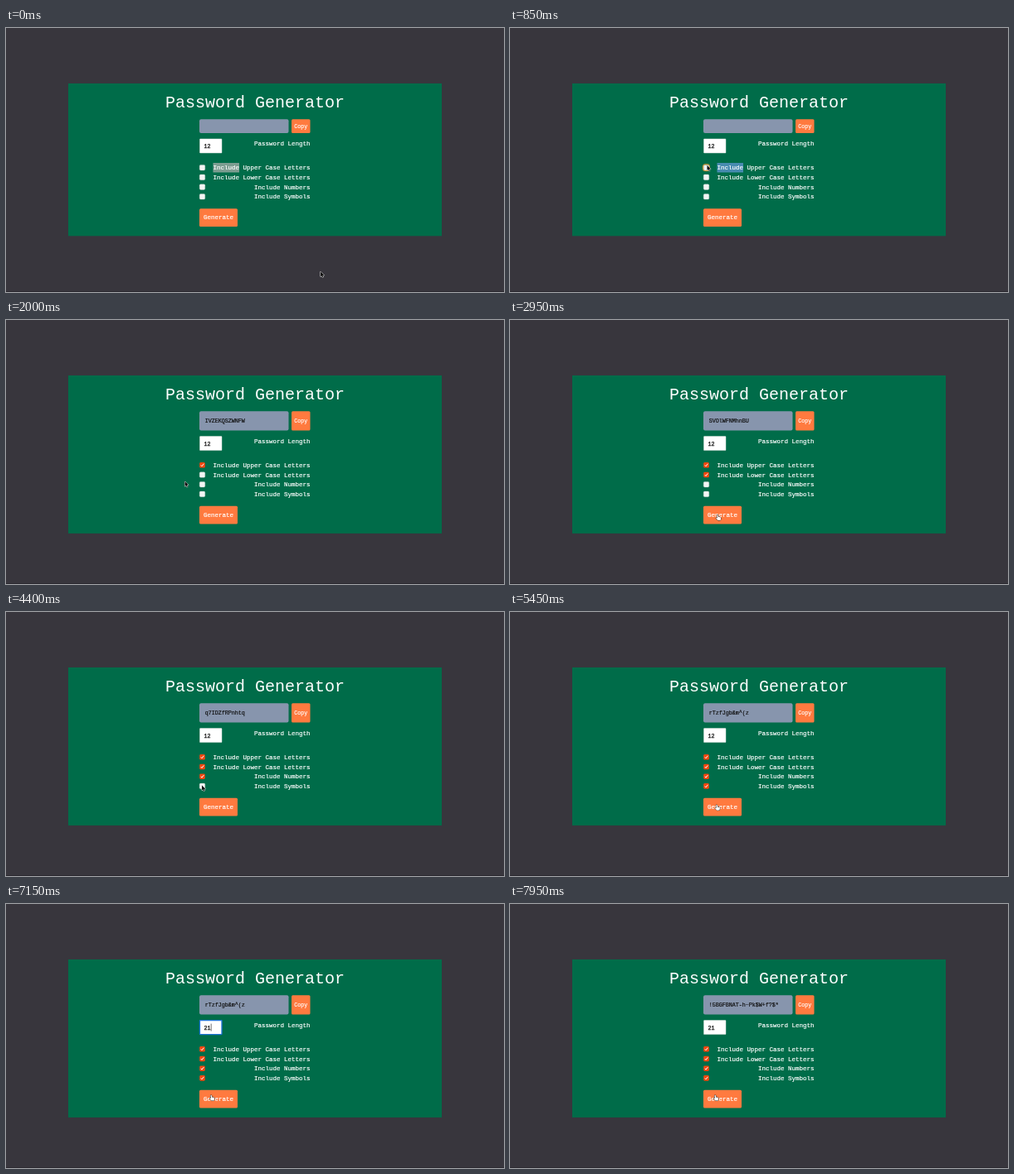
An HTML page with a canvas for the animation above (8000 ms loop, 600x319 px).

```html
<!DOCTYPE html>
<html lang="en">
<head>
<meta charset="utf-8">
<title>Password Generator</title>
<style>
html, body { margin: 0; width: 100%; height: 100%; overflow: hidden; background: #38363d; }
canvas { display: block; width: 600px; height: 319px; }
</style>
</head>
<body>
<canvas id="stage"></canvas>
<script>
const W = 600, H = 319, LOOP = 8000, STEP = 50;
const canvas = document.getElementById('stage');
const ctx = canvas.getContext('2d');
const dpr = window.devicePixelRatio || 1;
canvas.width = W * dpr;
canvas.height = H * dpr;

const MONO = '"Liberation Mono", "Courier New", monospace';
const ORANGE = '#ff7a3f';
const CHECKED = '#f4470f';

// Pointer stops: time, x, y
const path = [
  [0, 379, 294.5], [100, 376, 290], [450, 290, 205], [750, 237.5, 166], [950, 237.5, 166],
  [1350, 251, 234], [1700, 251, 234], [2000, 215.5, 195],
  [2300, 236, 185], [2500, 236, 185], [2800, 250.5, 235.5], [3400, 250.5, 235.5],
  [3650, 236, 197], [3800, 236, 197], [4050, 249, 233.5], [4200, 249, 233.5],
  [4400, 236, 209.5], [4700, 236, 209.5], [4900, 249, 235.5], [5400, 249, 235.5],
  [5850, 258, 165], [6200, 253, 145.5], [6850, 253, 145.5],
  [7100, 247.5, 231], [8000, 247.5, 231]
];

const passwords = [
  [1500, 'IVZEKQSZWNFW'], [2850, 'SVOlWFNMhnBU'], [4150, 'q7IDZfRPnhtq'],
  [4950, 'rTzfJgb&m^(z'], [7250, '!5BGFBNAT-h~Pk$W+f?$*']
];

const options = [
  ['Include Upper Case Letters', 900], ['Include Lower Case Letters', 2400],
  ['Include Numbers', 3700], ['Include Symbols', 4500]
];

function pointerAt(t) {
  const i = path.findIndex((p, k) => k > 0 && t <= p[0]);
  const [t0, x0, y0] = path[i - 1], [t1, x1, y1] = path[i];
  const u = (t - t0) / (t1 - t0), e = u * u * (3 - 2 * u);
  return [x0 + (x1 - x0) * e, y0 + (y1 - y0) * e];
}

function passwordAt(t) {
  return passwords.reduce((now, [at, s]) => t >= at ? s : now, '');
}

function lengthAt(t) {
  if (t < 6300) return 12;
  return Math.min(21, 13 + Math.max(0, Math.floor((t - 6400) / 50)));
}

function box(x, y, w, h, r, fill, stroke, line = 1) {
  ctx.beginPath();
  ctx.roundRect(x, y, w, h, r);
  if (fill) { ctx.fillStyle = fill; ctx.fill(); }
  if (stroke) { ctx.strokeStyle = stroke; ctx.lineWidth = line; ctx.stroke(); }
}

function text(s, x, y, size, color, align = 'left', weight = 0) {
  ctx.font = `${size}px ${MONO}`;
  ctx.textAlign = align;
  ctx.fillStyle = color;
  ctx.fillText(s, x, y);
  if (weight) {
    ctx.strokeStyle = color;
    ctx.lineWidth = weight;
    ctx.strokeText(s, x, y);
  }
}

function polygon(points, fill, stroke, line) {
  ctx.beginPath();
  for (let i = 0; i < points.length; i += 2) ctx.lineTo(points[i], points[i + 1]);
  ctx.closePath();
  ctx.strokeStyle = stroke;
  ctx.lineWidth = line;
  ctx.stroke();
  ctx.fillStyle = fill;
  ctx.fill();
}

function checkbox(y, on) {
  box(233.2, y - 3.3, 6.6, 6.6, 1.4, on ? CHECKED : '#f3f5f4', on ? null : '#b5c4bd', 0.4);
  if (!on) return;
  ctx.beginPath();
  ctx.moveTo(234.8, y + 0.1);
  ctx.lineTo(236, y + 1.4);
  ctx.lineTo(238.3, y - 1.6);
  ctx.strokeStyle = '#fff';
  ctx.lineWidth = 1;
  ctx.stroke();
}

function numberInput(t, y) {
  const focus = t >= 6250 && t < 7200;
  box(233.5, y, 26.5, 17, 0.5, '#fff', focus ? '#1f74d8' : '#d5ddd9', focus ? 1.3 : 0.5);
  text(lengthAt(t), 238.5, y + 11, 6.67, '#111', 'left', 0.25);
  if (focus) {
    ctx.fillStyle = '#111';
    ctx.fillRect(246.8, y + 4, 0.6, 9);
  }
  if (t >= 6100 && t < 6950) {
    box(249, y + 3.5, 6, 8, 1, '#d9d9d9', '#999', 0.4);
    ctx.fillStyle = '#444';
    for (const [base, tip] of [[6.5, 4.5], [8.8, 10.8]]) {
      ctx.beginPath();
      ctx.moveTo(250.2, y + base);
      ctx.lineTo(253.8, y + base);
      ctx.lineTo(252, y + tip);
      ctx.fill();
    }
  }
}

function pointer(x, y, hand) {
  ctx.save();
  ctx.translate(x, y);
  ctx.lineJoin = 'round';
  if (hand) {
    polygon([-1, 0, 0.2, 0, 0.6, 2.4, 3, 2.8, 3.6, 3.6, 3.2, 6.4, 0, 6.6, -2.4, 4, -1.8, 3.4, -0.7, 4],
      '#fff', '#222', 1);
  } else {
    polygon([0, 0, 0, 6, 1.4, 4.8, 2.4, 7, 3.4, 6.5, 2.5, 4.4, 4.3, 4.3], '#111', '#e8e8e8', 1);
  }
  ctx.restore();
}

function draw(t) {
  const password = passwordAt(t), d = password ? 6.6 : 0;
  ctx.setTransform(dpr, 0, 0, dpr, 0, 0);
  ctx.fillStyle = '#38363d';
  ctx.fillRect(0, 0, W, H);
  ctx.fillStyle = '#2b2930';
  ctx.fillRect(0, 318, W, 1);
  ctx.fillStyle = '#006c49';
  ctx.fillRect(75, 67, 450, 184.3 + d);
  text('Password Generator', 300, 96, 20, '#fff', 'center');

  box(233, 110.3, 107.5, 16.7 + d, 2, '#8795ad');
  text(password, 239.8, 124.3, 6.67, '#111', 'left', 0.2);
  box(344, 110.3, 22.5, 16.7 + d, 1.5, ORANGE);
  text('Copy', 355.2, 120.8 + d / 2, 6.67, '#fff', 'center', 0.15);

  numberInput(t, 134 + d);
  text('Password Length', 366.5, 142 + d, 7.5, '#fff', 'right', 0.2);

  if (t < 900) {
    ctx.fillStyle = t < 750 ? '#7d9d91' : '#478bb0';
    ctx.fillRect(249.5, 163, 31.5, 11.5);
  }
  options.forEach(([label, at], i) => {
    const y = 168.7 + i * 11.7 + d;
    checkbox(y, t >= at);
    text(label, 366.5, y + 2.5, 7.5, '#fff', 'right', 0.2);
  });
  if (t >= 800 && t < 950) box(232.6, 164.8, 7.8, 7.8, 2, null, '#f59a32', 1);

  const top = 218.2 + d;
  box(233, top, 46, 21.8, 1.5, ORANGE);
  text('Generate', 256, top + 13.2, 7.5, '#fff', 'center', 0.2);

  const [x, y] = pointerAt(t);
  pointer(x, y, x > 233 && x < 279 && y > top && y < top + 21.8);
}

const start = performance.now();
function tick(now) {
  const t = Math.max(0, now - start) % LOOP;
  draw(Math.floor(t / STEP) * STEP);
  requestAnimationFrame(tick);
}
draw(0);
requestAnimationFrame(tick);
</script>
</body>
</html>
```
